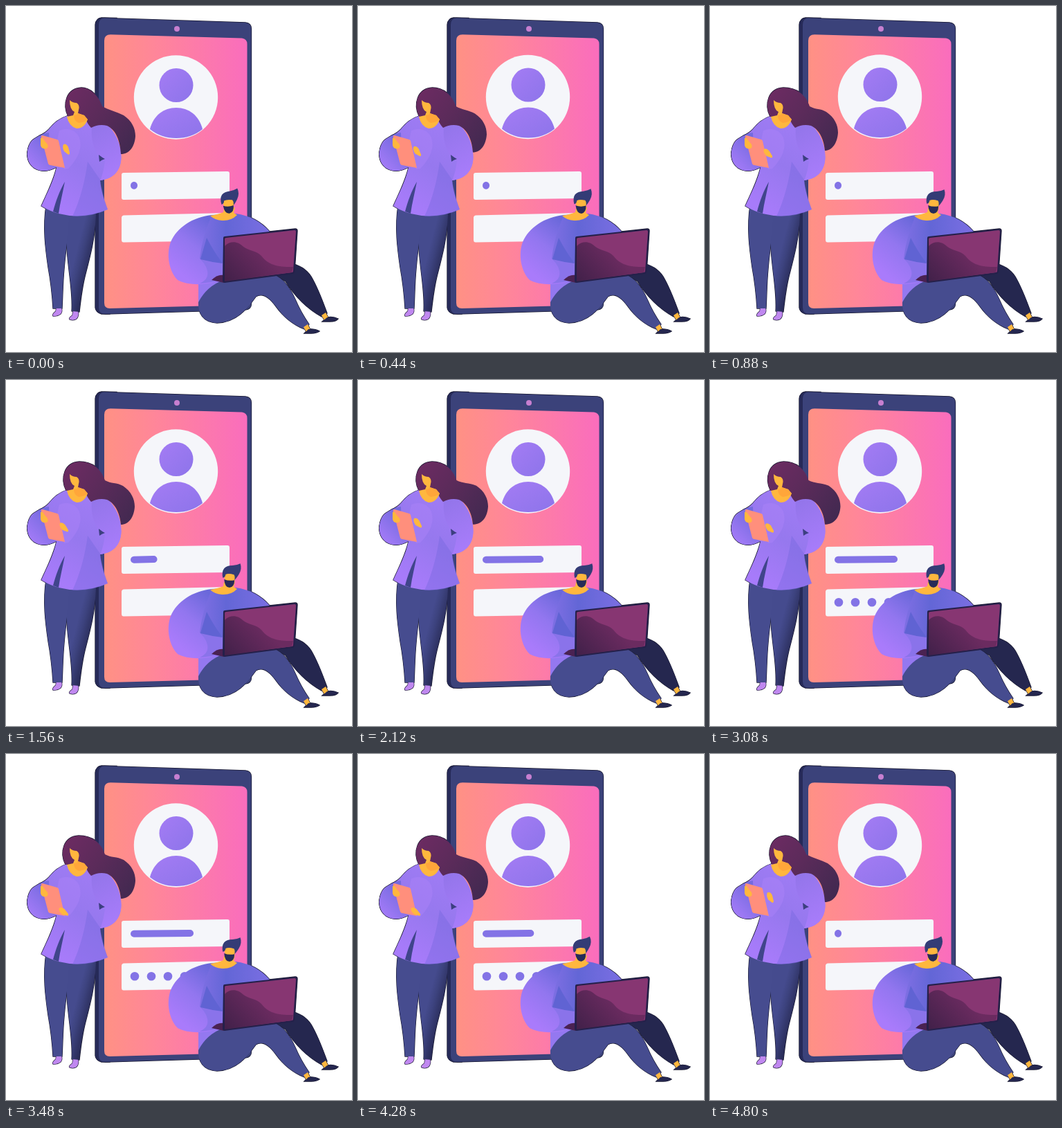
An HTML page for the animation above (4.84 s loop, 500 px wide and 500 px high).

```html
<!DOCTYPE html>
<html lang="en">
<head>
<meta charset="utf-8">
<title>Sign-in scene</title>
<style>
html, body { margin: 0; width: 100%; height: 100%; overflow: hidden; background: #fff; }
svg { display: block; width: 100vw; height: 100vh; }
</style>
</head>
<body>
<svg viewBox="0 0 500 500">
  <defs>
    <linearGradient id="screen" gradientUnits="userSpaceOnUse" x1="142" y1="0" x2="349" y2="0">
      <stop offset="0" stop-color="#ff9184"/><stop offset=".35" stop-color="#ff8699"/><stop offset="1" stop-color="#fa6dbd"/>
    </linearGradient>
    <linearGradient id="avatarFill" x1="0" y1="0" x2="1" y2="1">
      <stop offset="0" stop-color="#a47cf4"/><stop offset="1" stop-color="#8d74ea"/>
    </linearGradient>
    <linearGradient id="hair" gradientUnits="userSpaceOnUse" x1="86" y1="125" x2="187" y2="200">
      <stop offset="0" stop-color="#6c2b62"/><stop offset=".45" stop-color="#5b2b5a"/><stop offset="1" stop-color="#412950"/>
    </linearGradient>
    <linearGradient id="shirt" gradientUnits="userSpaceOnUse" x1="65" y1="285" x2="135" y2="170">
      <stop offset="0" stop-color="#a77bfa"/><stop offset=".5" stop-color="#9678ee"/><stop offset="1" stop-color="#a07cf5"/>
    </linearGradient>
    <linearGradient id="cuff" gradientUnits="userSpaceOnUse" x1="35" y1="232" x2="68" y2="200">
      <stop offset="0" stop-color="#a47bf8"/><stop offset="1" stop-color="#736ade"/>
    </linearGradient>
    <linearGradient id="sleeve" gradientUnits="userSpaceOnUse" x1="160" y1="240" x2="125" y2="175">
      <stop offset="0" stop-color="#a77cfa"/><stop offset="1" stop-color="#9375ea"/>
    </linearGradient>
    <linearGradient id="backLeg" gradientUnits="userSpaceOnUse" x1="99" y1="365" x2="126" y2="372">
      <stop offset="0" stop-color="#454b8e"/><stop offset=".3" stop-color="#3d437f"/><stop offset="1" stop-color="#252750"/>
    </linearGradient>
    <linearGradient id="arm" gradientUnits="userSpaceOnUse" x1="250" y1="385" x2="305" y2="318">
      <stop offset="0" stop-color="#a97bfb"/><stop offset=".5" stop-color="#9276ef"/><stop offset="1" stop-color="#6a68da"/>
    </linearGradient>
    <linearGradient id="chest" gradientUnits="userSpaceOnUse" x1="285" y1="0" x2="380" y2="0">
      <stop offset="0" stop-color="#7c6ee2"/><stop offset=".35" stop-color="#6366d6"/><stop offset="1" stop-color="#7a6ee2"/>
    </linearGradient>
    <linearGradient id="glow" gradientUnits="userSpaceOnUse" x1="318" y1="395" x2="365" y2="350">
      <stop offset="0" stop-color="#43214a"/><stop offset="1" stop-color="#6b2b60"/>
    </linearGradient>
  </defs>

  <!-- thin dark rim around the whole scene -->
  <g stroke="#15152c" stroke-width="1.3">
    <use href="#phone"/><use href="#woman"/><use href="#man"/>
  </g>

  <g id="phone">
    <path fill="#262a58" d="M129 27Q130 18 138 17L160 17.5L150 445L138 445Q130 443 129 436Z"/>
    <path fill="#3b427a" d="M134 27Q134 18 142 17.5L346 24Q354.5 25 354.5 33V430Q354.5 438 346 439L144 445Q134 445 134 436Z"/>
    <path fill="url(#screen)" d="M142 50Q142 41.3 151 41.3L341 46.5Q348.5 47.5 348.5 55V424Q348.5 431 341 432L150 437Q142 437 142 429Z"/>
    <circle cx="247" cy="33" r="4" fill="#c77fd0"/>
    <g id="avatar">
      <circle cx="245.5" cy="132" r="60.7" fill="#f5f6fa"/>
      <circle cx="246" cy="114.5" r="24.5" fill="url(#avatarFill)"/>
      <path fill="url(#avatarFill)" d="M208 178C213 158 228 147 246 147S279 158 284 178Q268 191 246 191T208 178Z"/>
    </g>
    <path fill="#f5f6fa" d="M167 244Q167 241 170 241L320 239Q323 239 323 242V275Q323 278 320 278L170 280Q167 280 167 277Z"/>
    <path fill="#f5f6fa" d="M167 306Q167 303 170 302.5L320 299V339L170 341.5Q167 341.5 167 338Z"/>
    <line id="bar" x1="185" y1="259.7" y2="259" stroke="#8373e6" stroke-width="10" stroke-linecap="round"/>
    <g id="dots" fill="#8373e6" stroke="none"></g>
  </g>

  <g id="woman">
    <path fill="#c088f0" d="M73 434L80 436Q82 441 79 445Q74 449 68 448Q66 446 72 441Z"/>
    <path fill="#c088f0" d="M97 440L104 441Q106 447 102 452Q98 455 92 453Q90 451 96 447Z"/>
    <path fill="url(#backLeg)" d="M86 296L130 300C129 334 122 360 115 387C110 406 108 424 106 442L95 441C97 414 90 384 88 350Z"/>
    <path fill="#464c8f" d="M58 288L91 298C91 330 86 352 84 380C82 400 82 420 81 437L68 437C67 420 65 400 61 378C57 350 53 320 58 288Z"/>
    <path fill="url(#shirt)" d="M88 159C78 162 69 169 62 178C54 187 44 188 37 195C30 204 29 218 34 227C41 239 57 242 73 233C69 252 60 269 51 289Q62 296 76 300Q112 309 147 294C141 279 137 264 136 252C153 250 166 240 166.500 219C167 200 157 180 145 170Q133 162 116 160Z"/>
    <path fill="#7468dc" opacity=".4" d="M136 251Q139 270 147 294Q125 305 96 304Q112 270 118 225Z"/>
    <path fill="url(#cuff)" d="M62 183C45 185 29 200 31 217C34 238 57 244 74 231L64 229Z"/>
    <path fill="#a982f8" opacity=".55" d="M77 180Q97 173 106 190Q113 211 90 235L84 236L74 194Z"/>
    <path fill="url(#sleeve)" d="M124 174C122 195 128 215 143 224C141 238 139 246 136 252C153 250 166 240 166.500 219C167 200 157 180 144 171Z"/>
    <path fill="#3c3f80" d="M134 215Q139 219 143 221Q139 222 135 225Z"/>
    <path fill="#40458b" d="M85 254C77 268 72 282 68 297L76 300C78 285 82 270 85 254Z"/>
    <path id="mane" fill="url(#hair)"/>
    <path fill="#ffb73e" d="M92 136Q96 140 102 140Q107 143 105 150L104 155L113 158L118 164Q113 177 102 177Q91 174 88 160L97 158L99 153Q92 150 92 136Z"/>
    <path fill="#ffa63a" d="M104 155L113 158L118 164Q114 168 105 169Q98 166 98 158Q102 158 104 155Z"/>
    <path fill="#ff8f7c" d="M51 190Q50 187 53 187L74 193Q76 194 76 195L85 234L64 230Q62 230 61 228Z"/>
    <path fill="#ffb73e" d="M50 191Q53 189 55 194L60 200Q62 206 57 206Q51 207 50 201Z"/>
    <path id="thumb" fill="#ffb73e" d="M-4 -7Q0 -9 3 -3L5 5Q5 9 2 7L-3 3Q-6 -3 -4 -7Z"/>
  </g>

  <g id="man">
    <path fill="#25274f" d="M410 372Q430 375 441 391C451 408 457 425 464 444L456 449C440 440 420 424 404 398L390 389Z"/>
    <path fill="#ffb73e" d="M456 447L462 443L466 451L460 454Z"/>
    <path fill="#25274f" d="M457 456L464 450Q472 448 480 452Q477 456 468 456Z"/>
    <path fill="#464c8f" d="M278 402L320 392L386 388C401 393 411 408 418 424C424 438 431 450 438 460L431 467C412 459 400 448 390 434C382 423 372 413 361 420C348 438 333 457 305 458C285 457 277 444 278 427Z"/>
    <path fill="#9478f0" d="M278 399L314 396Q290 405 278 428Z"/>
    <path fill="#ffb73e" d="M430 464L436 460L440 468L434 471Z"/>
    <path fill="#25274f" d="M431 473L437 467Q446 466 453 470Q449 473 441 473Z"/>
    <path fill="url(#chest)" d="M296 302L332 300Q362 304 381 326L350 360L320 390L280 400L272 350Z"/>
    <path fill="url(#arm)" d="M297 302C270 305 247 320 238 341C231 360 236 384 248 396C264 405 292 403 312 397L312 390Q296 381 280 365Q283 337 295 308Z"/>
    <path fill="#8a73ea" d="M282 366Q297 369 313 371V397L280 401Q302 391 282 366Z"/>
    <path fill="#6063d3" d="M290 335Q299 353 313 372Q296 370 281 366Z"/>
    <path fill="#ffb73e" d="M315 292L331 291L329 299L334 302Q325 311 312 310Q301 309 295 303Q307 301 314 298Z"/>
    <g id="head">
      <path fill="#ffb73e" d="M314 279L331 278Q332 289 328 296L318 296Z"/>
      <path fill="#272b58" d="M315 288Q322 291 330 289Q330 299 323 300Q316 300 315 288Z"/>
      <path fill="#343c76" d="M313 286Q311 277 315 272Q319 268 327 268Q334 267 338 265Q341 273 336 281Q333 286 330 289Q331 283 329 281Q321 279 317 281Q317 285 313 286Z"/>
    </g>
    <path fill="#4a2252" d="M297 396Q306 387 315 389V400Z"/>
    <path fill="#25204a" d="M314 335Q314 333 316 333L418 322Q421 322 421 325L417 384Q417 386 415 387L316 400Q313 400 313 397Z"/>
    <path fill="#873672" d="M316 337Q316 335 318 335L417 324Q419 324 419 326L415 383Q415 385 413 385L317 397Z"/>
    <path fill="url(#glow)" d="M316 347C325 338 336 341 342 347C350 354 362 353 369 361C377 372 390 378 415 377L413 385L316 398Z"/>
  </g>
</svg>
<script>
const LOOP = 4840, STEP = 40;
const get = id => document.getElementById(id);
const set = (el, attrs) => { for (const k in attrs) el.setAttribute(k, attrs[k]); };
const ease = x => { x = Math.max(0, Math.min(1, x)); return x * x * (3 - 2 * x); };
const ramp = (t, from, to) => ease((t - from) / (to - from));

const TIMES = [0, 880, 1560, 2680, 3480, 4280, LOOP];
// One value per key time; the last segment returns to the first value.
function track(t, values) {
  let i = 0;
  while (i < 5 && t >= TIMES[i + 1]) i++;
  const a = values[i], b = values[(i + 1) % values.length];
  return a + (b - a) * ramp(t, TIMES[i], TIMES[i + 1]);
}

const dots = [186, 210, 234, 258].map(cx => {
  const dot = document.createElementNS("http://www.w3.org/2000/svg", "circle");
  set(dot, { cx, cy: 321.2 });
  get("dots").append(dot);
  return dot;
});

function mane(t) {
  const left = track(t, [86, 83, 83, 85, 82, 84]);
  const right = track(t, [187, 185, 186, 190, 187, 188]);
  const low = track(t, [214, 209, 209, 208.5, 209, 211]);
  const neck = track(t, [139, 144, 143, 142, 143, 142]);
  return `M${left + 4} 160C${left - 5} 142 ${left + 1} 119 ${left + 23} 118` +
    `C${neck - 18} 118 ${neck - 5} 129 ${neck} 145` +
    `C${neck + 9} 150 160 ${low - 61} ${right - 17} ${low - 56}` +
    `C${right - 5} ${low - 48} ${right} ${low - 37} ${right} ${low - 26}` +
    `C${right - 1} ${low - 10} ${right - 9} ${low} 166 ${low}` +
    `C165 195 159 179 146 173Q134 170 123 176Q118 171 114 161L104 160Z`;
}

function draw(t) {
  const width = ramp(t, 1100, 2250) - ramp(t, 4090, 4740);
  set(get("bar"), { x2: 185.05 + 81 * width });
  dots.forEach((dot, i) => {
    const start = 2370 + 120 * i;
    set(dot, { r: 6.3 * (ramp(t, start, start + 360) - ramp(t, 4330, 4700)) });
  });
  const bob = track(t, [0, -1, 0, 0, 0, 0]);
  set(get("avatar"), { transform: `translate(0 ${bob})` });
  set(get("mane"), { d: mane(t) });
  const x = track(t, [87, 83.5, 83.5, 88.5, 83, 83]);
  const y = track(t, [207, 213, 213, 200, 228, 228]);
  const turn = track(t, [0, -18, -18, -5, -25, -25]);
  set(get("thumb"), { transform: `translate(${x} ${y}) rotate(${turn})` });
  const nod = track(t, [-6, 1, 1, 0, 1, -5]);
  set(get("head"), { transform: `rotate(${nod} 321 300)` });
}

const begin = performance.now();
function tick() {
  const t = (performance.now() - begin) % LOOP;
  draw(Math.floor(t / STEP) * STEP);
  requestAnimationFrame(tick);
}
tick();
</script>
</body>
</html>
```
